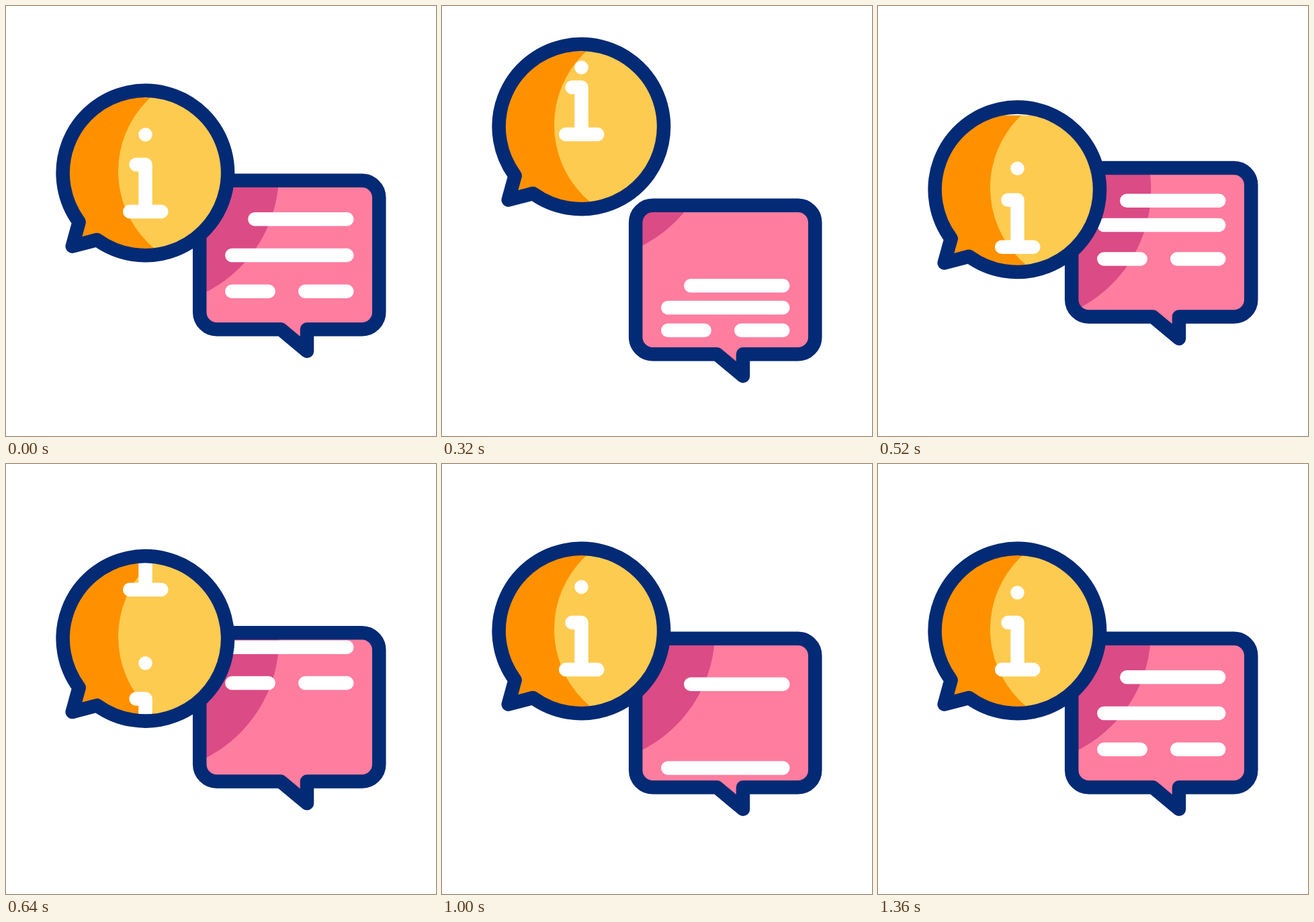
These frames come from a looping animation (640x640 px, 1480 ms). An HTML page:

```html
<!DOCTYPE html>
<html lang="en">
<head>
<meta charset="utf-8">
<title>Speech bubbles</title>
<style>
  html, body { margin: 0; height: 100%; overflow: hidden; background: #fff; }
  svg { display: block; width: 100vw; height: 100vh; }
  .outline { fill: none; stroke: #032a75; stroke-width: 20.5; stroke-linejoin: round; }
  .ink { fill: none; stroke: #fff; stroke-width: 20.5; stroke-linecap: round; stroke-linejoin: round; }
</style>
</head>
<body>
<svg viewBox="0 0 640 640">
  <defs>
    <path id="boxShape" d="M313.7 259.8H529.8A25.5 25.5 0 0 1 555.3 285.3V455.7A25.5 25.5 0 0 1 529.8 481.2H448V513.7L409 481.2H313.7A25.5 25.5 0 0 1 288.2 455.7V285.3A25.5 25.5 0 0 1 313.7 259.8Z"/>
    <path id="roundShape" d="M108.7 321.5A122.7 122.7 0 1 1 135.5 348L98.7 357.7Z"/>
    <clipPath id="boxClip"><use href="#boxShape"/></clipPath>
    <clipPath id="roundClip"><use href="#roundShape"/></clipPath>
  </defs>
  <g id="box">
    <g clip-path="url(#boxClip)">
      <use href="#boxShape" fill="#ff7d9f"/>
      <circle id="shade" cx="207.5" cy="248.8" r="198.8" fill="#db4b86"/>
      <g id="lines" class="ink"></g>
    </g>
    <use href="#boxShape" class="outline"/>
  </g>
  <g id="round">
    <g clip-path="url(#roundClip)">
      <use href="#roundShape" fill="#ff9100"/>
      <circle cx="317" cy="246" r="150" fill="#fdcb50"/>
      <g id="letter" class="ink"></g>
    </g>
    <use href="#roundShape" class="outline"/>
  </g>
</svg>
<script>
const STEP = 40, STEPS = 37, PACKED = 8.2;
const $ = id => document.getElementById(id);
const shift = (el, y) => el.setAttribute('transform', `translate(0 ${y.toFixed(2)})`);

// Smoothly eased value at time n, from keys of [time, value].
function track(keys, n) {
  const i = keys.findIndex(([time]) => n < time);
  if (i === 0) return keys[0][1];
  if (i < 0) return keys[keys.length - 1][1];
  const [t0, v0] = keys[i - 1], [t1, v1] = keys[i];
  const u = (n - t0) / (t1 - t0);
  return v0 + (v1 - v0) * u * u * (3 - 2 * u);
}

const movers = [];

// A part packs together, leaves on one side and comes back from the other.
function addPart(group, d, pack, [gone, exit], [start, end, entry]) {
  const tracks = [
    [[2, 0], [8, pack], [PACKED, pack], [gone, exit]],
    [[start, entry], [end, 0]]
  ];
  for (const keys of tracks) {
    const el = document.createElementNS('http://www.w3.org/2000/svg', 'path');
    el.setAttribute('d', d);
    $(group).append(el);
    movers.push({ el, keys });
  }
}

addPart('letter', 'M207.5 191.6h.01', -31, [23.5, 211], [20, 26.4, -70]);
addPart('letter', 'M193.5 236H207.5V306M184.2 306H231.3', -46, [19.7, 150], [12.4, 22.8, -180]);
addPart('lines', 'M370.3 317.2H507.3', 62, [17.6, -75], [17.2, 26.3, 192]);
addPart('lines', 'M336.3 371H507.3', 41, [19, -120], [21, 30.1, 138]);
addPart('lines', 'M336.3 424.7H390.7M445.3 424.7H507.3', 21, [23.5, -195], [24.8, 33.9, 105]);

const roundKeys = [[2.5, 0], [8, -69], [12.6, 25], [19, 0]];
const boxKeys = [[2, 0], [8, 37], [12.6, -19], [19, 0]];

function draw() {
  const n = Math.floor(performance.now() / STEP) % STEPS;
  const roundY = track(roundKeys, n), boxY = track(boxKeys, n);
  shift($('round'), roundY);
  shift($('box'), boxY);
  shift($('shade'), roundY - boxY);
  for (const { el, keys } of movers) shift(el, track(keys, n));
  requestAnimationFrame(draw);
}
draw();
</script>
</body>
</html>
```
